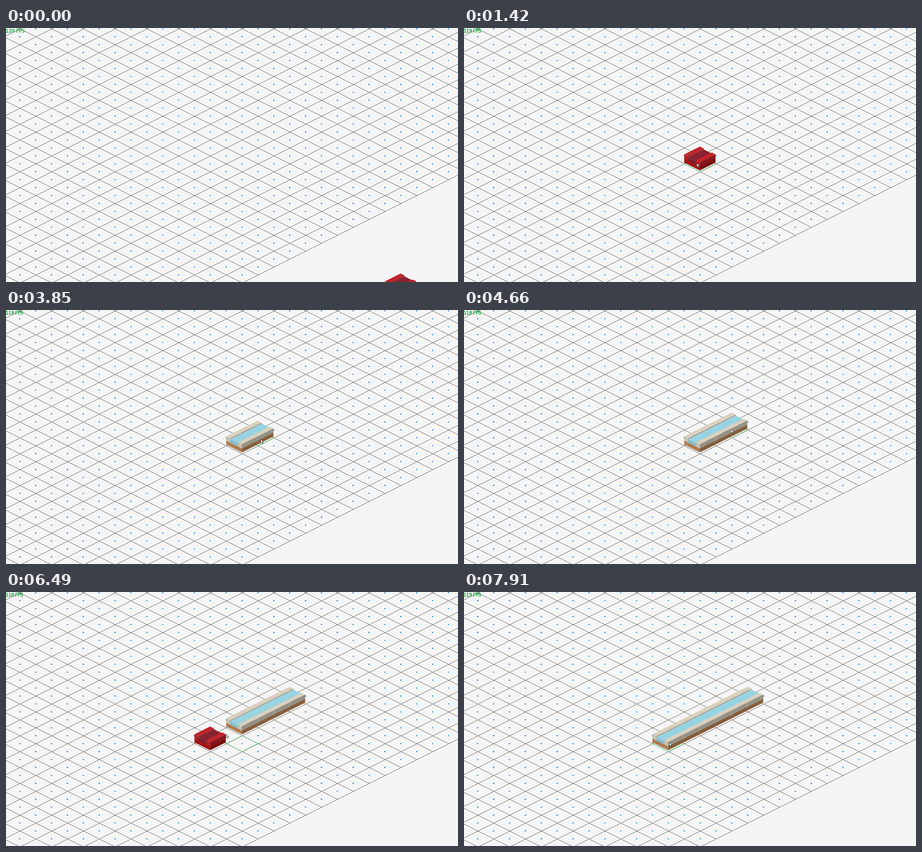
An HTML page with a canvas that plays this animation: 998 px wide and 561 px high, repeating every 8 s.

```html
<!DOCTYPE html>
<html lang="en">
<head>
<meta charset="utf-8">
<title>Isometric river builder</title>
<style>
html, body { margin: 0; width: 100%; height: 100%; overflow: hidden; background: #f5f5f5; }
canvas { display: block; }
</style>
</head>
<body>
<canvas id="stage" width="998" height="561"></canvas>
<script>
const ctx = document.getElementById('stage').getContext('2d');
const LOOP = 8000, TICK = 101.3;

// The world is laid out in whole pixels and shown scaled down.
const WORLD_W = 1708, WORLD_H = 960, SCALE = 998 / WORLD_W;
const TILE_W = 120, TILE_H = 60, ORIGIN_X = 892, ORIGIN_Y = 513;
const HALF_W = TILE_W / 2 * SCALE, HALF_H = TILE_H / 2 * SCALE;
const BASE_X = ORIGIN_X * SCALE, BASE_Y = ORIGIN_Y * SCALE;
const BLOCK = 34.6;   // half width of a block

// Stops of the pointer: arrival tick, x, y.
const MOVE_TICKS = 3;
const stops = [
  [0, 880, 582], [4, 484, 282], [10, 517, 332], [13, 514, 299], [19, 590, 298],
  [25, 521, 297], [31, 574, 272], [34, 590, 298], [38, 562.5, 286], [42, 589, 264],
  [52, 619, 248], [60, 452, 333], [63, 452, 333], [63.5, 518, 334], [64, 486, 314],
  [75, 453.5, 332]
];
// Tick at which each river piece is placed, and its place along the river.
const builds = [[26, 0], [38, 1], [46, 2], [53, 3], [72, -1], [77, -2]];
const FPS_TICKS = 7.7;
const fpsReadings = [120, 119, 120, 120, 119, 118, 119, 120, 118, 119, 119];

const centre = (i, j) => [BASE_X + i * HALF_W, BASE_Y + j * HALF_H];
const smooth = f => f * f * (3 - 2 * f);

function pointerAt(tick) {
  const next = stops.findIndex(stop => stop[0] > tick);
  if (next === 0) return stops[0].slice(1);
  if (next < 0) return stops[stops.length - 1].slice(1);
  const [t0, x0, y0] = stops[next - 1], [t1, x1, y1] = stops[next];
  const duration = Math.min(MOVE_TICKS, t1 - t0);
  const f = smooth(Math.max(0, 1 - (t1 - tick) / duration));
  return [x0 + (x1 - x0) * f, y0 + (y1 - y0) * f];
}

function tileAt([x, y]) {
  const a = (x - BASE_X) / HALF_W, b = (y - BASE_Y) / HALF_H;
  const p = Math.round((a + b) / 2), q = Math.round((a - b) / 2);
  return [p + q, p - q];
}

function polygon(points) {
  ctx.beginPath();
  for (const [x, y] of points) ctx.lineTo(x, y);
  ctx.closePath();
}

function makeGrid() {
  const grid = document.createElement('canvas');
  grid.width = WORLD_W;
  grid.height = WORLD_H;
  const g = grid.getContext('2d');
  g.fillStyle = '#f5f5f5';
  g.fillRect(0, 0, WORLD_W, WORLD_H);

  // Stepped lines, two pixels across for each pixel down.
  const cornerY = ORIGIN_Y + 7.5 * TILE_H;
  const edge = x => cornerY - (x - ORIGIN_X) / 2;
  g.fillStyle = '#000';
  for (let x = 0; x < WORLD_W; x += 2) {
    for (let k = 0; k < 32; k++) {
      g.fillRect(x, edge(x) - k * TILE_H, 2, 1);
      const down = cornerY + (x - ORIGIN_X) / 2 + (k - 24) * TILE_H;
      if (down <= edge(x)) g.fillRect(x, down, 2, 1);
    }
  }

  g.fillStyle = '#0079f1';
  for (let i = -14; i <= 13; i++) {
    for (let j = -17; j <= 14 - i && j <= 14; j++) {
      if ((i + j) % 2 === 0)
        g.fillRect(ORIGIN_X + i * TILE_W / 2 - 2, ORIGIN_Y + j * TILE_H / 2 - 2, 4, 4);
    }
  }
  return grid;
}

function drawHover([i, j]) {
  const [x, y] = centre(i, j);
  polygon([[x - HALF_W, y], [x, y - HALF_H], [x + HALF_W, y], [x, y + HALF_H]]);
  ctx.strokeStyle = 'rgba(0,228,48,.75)';
  ctx.lineWidth = .8;
  ctx.stroke();
}

// u runs up-right along the river, v runs down-right across it, h is height.
function drawBlock([i, j], isPreview) {
  const [cx, cy] = centre(i, j);
  const tint = isPreview ? [230, 41, 55] : [255, 255, 255];
  const at = (u, v, h) =>
    [cx - .4 + (u + v - 1) * BLOCK, cy - 2.6 + (v - u) * BLOCK / 2 - h];
  const fill = (color, points) => {
    polygon(points);
    ctx.fillStyle = `rgb(${color.map((c, n) => Math.round(c * tint[n] / 255))})`;
    ctx.fill();
  };
  const top = (color, v0, v1, h) =>
    fill(color, [at(0, v0, h), at(1, v0, h), at(1, v1, h), at(0, v1, h)]);
  const front = (color, v0, v1, h0, h1) =>
    fill(color, [at(0, v0, h0), at(0, v1, h0), at(0, v1, h1), at(0, v0, h1)]);
  const side = (color, v, h0, h1) =>
    fill(color, [at(0, v, h0), at(1, v, h0), at(1, v, h1), at(0, v, h1)]);

  const bank = [217, 209, 190], bankFront = [201, 193, 172], bankSide = [149, 145, 132];
  top([152, 211, 226], .25, .77, 16);
  side(bankSide, .25, 16, 18);
  top(bank, 0, .25, 18);
  top(bank, .76, 1, 18);
  front(bankFront, 0, .26, 8, 18);
  front([134, 190, 207], .25, .77, 8, 16);
  front(bankFront, .76, 1, 8, 18);
  front([176, 124, 80], 0, 1, 0, 8.4);
  side(bankSide, 1, 8, 18);
  side([133, 94, 60], 1, 0, 8.4);
}

function drawPointer([x, y]) {
  const arrow = [[0, 0], [0, 8], [1.9, 6.3], [3.2, 9], [4.6, 8.4], [3.4, 5.8], [6, 5.6]];
  polygon(arrow.map(([dx, dy]) => [x + dx, y + dy]));
  ctx.fillStyle = '#fff';
  ctx.strokeStyle = '#222';
  ctx.lineWidth = .8;
  ctx.fill();
  ctx.stroke();
}

function drawFps(value) {
  ctx.font = '10.5px "DejaVu Sans", sans-serif';
  ctx.letterSpacing = value < 120 ? '-0.6px' : '0px';
  ctx.fillStyle = ctx.strokeStyle = '#009e2f';
  ctx.lineWidth = .3;
  ctx.fillText(value + ' FPS', -1, 10);
  ctx.strokeText(value + ' FPS', -1, 10);
}

const grid = makeGrid();
ctx.imageSmoothingQuality = 'low';

function render(now) {
  const tick = Math.floor(now % LOOP / TICK);
  // The outline trails the pointer and the preview trails the outline.
  const hover = tileAt(pointerAt(tick - .5));
  const preview = tileAt(pointerAt(tick - 1));

  const placed = builds.filter(([start]) => start <= tick).map(([, k]) => [k, -k]);
  const covered = placed.some(([i, j]) => i === preview[0] && j === preview[1]);
  const blocks = covered ? placed : [...placed, preview];
  blocks.sort((a, b) => a[1] - b[1]);

  ctx.drawImage(grid, 0, 0, 998, 561);
  drawHover(hover);
  for (const tile of blocks) drawBlock(tile, tile === preview);
  drawFps(fpsReadings[Math.floor(tick / FPS_TICKS)]);
  drawPointer(pointerAt(tick));
  requestAnimationFrame(render);
}
requestAnimationFrame(render);
</script>
</body>
</html>
```
